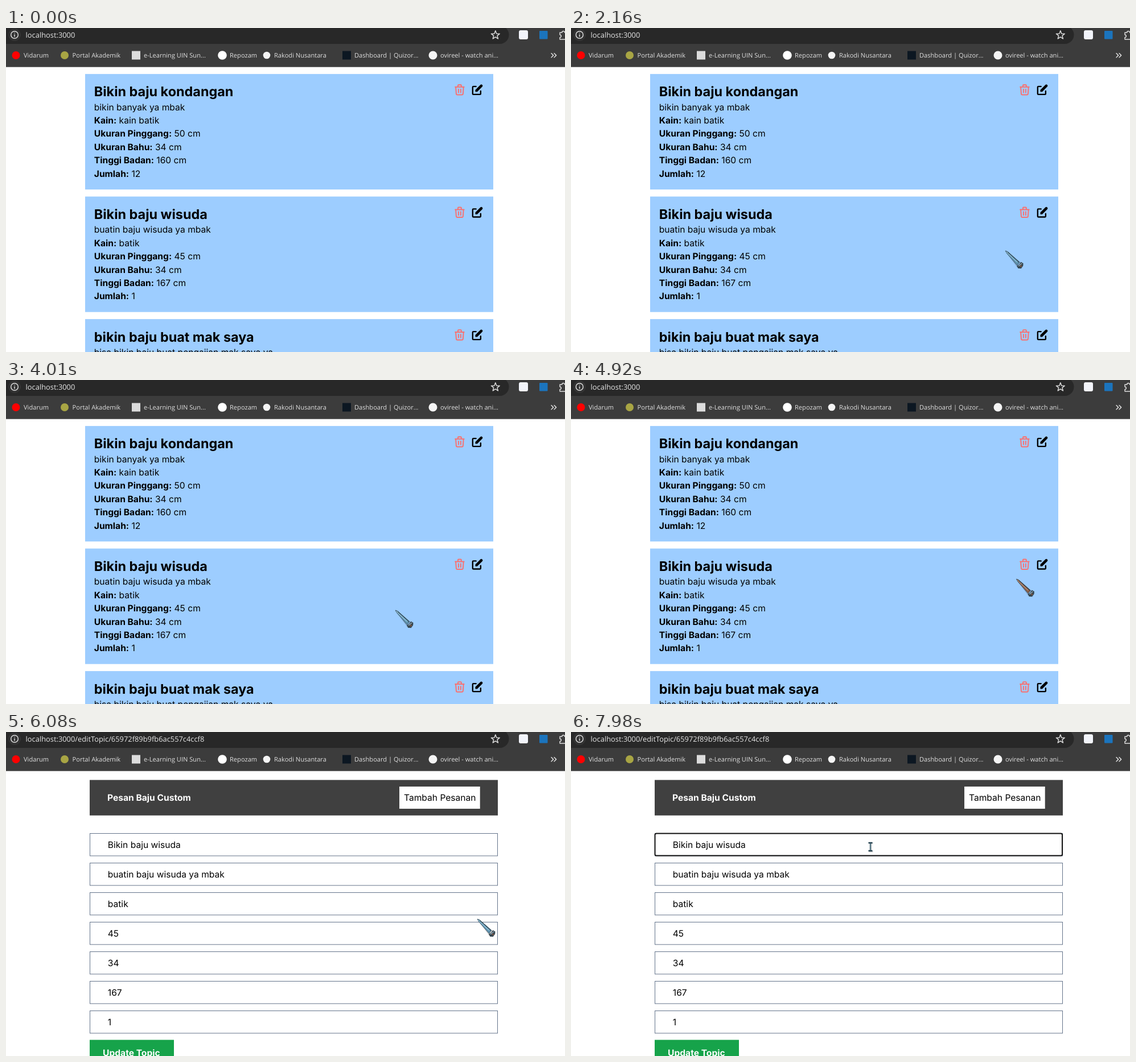
These frames come from a looping animation (982x570 px, 8000 ms). An HTML page:

```html
<!DOCTYPE html>
<html lang="id">
<head>
<meta charset="utf-8">
<title>Pesan Baju Custom</title>
<style>
html, body { margin: 0; width: 100%; height: 100%; overflow: hidden; background: #fff; }
svg { display: block; width: 100vw; height: 100vh; }
text { font: 400 15.6px Inter, sans-serif; font-variation-settings: "opsz" 14; text-rendering: geometricPrecision; }
text.title { font-weight: 700; font-size: 23.4px; }
.bold { font-weight: 700; }
text.url { font: 12.87px "Open Sans", sans-serif; fill: #e6e6e6; }
text.mark { font: 11.1px "Open Sans", sans-serif; fill: #dedede; }
.line { fill: none; stroke: #dcdcdc; stroke-width: 1.5; stroke-linejoin: round; stroke-linecap: round; }
.field { fill: #fff; stroke: #64748b; stroke-width: 1; }
</style>
</head>
<body>
<svg id="stage" viewBox="0 0 982 570" preserveAspectRatio="none"></svg>
<script>
const LOOP = 8000, START = 460, STEP = 68.4;
const OPEN_FORM = 82, FOCUS = 102, CARET_OFF = 110;
const HOST = 'localhost:3000';

const text = (x, y, s, cls = '', fill = '') =>
  `<text x="${x}" y="${y}" class="${cls}"${fill && ` fill="${fill}"`}>${s}</text>`;
const rect = (x, y, w, h, fill, r = 0) =>
  `<rect x="${x}" y="${y}" width="${w}" height="${h}" rx="${r}" fill="${fill}"/>`;
const disc = (x, y, r, fill) => `<circle cx="${x}" cy="${y}" r="${r}" fill="${fill}"/>`;
const line = d => `<path class="line" d="${d}"/>`;

function star(cx, cy, outer, inner) {
  let d = '';
  for (let i = 0; i < 10; i++) {
    const r = i % 2 ? inner : outer, a = i * Math.PI / 5;
    d += (i ? 'L' : 'M') + (cx + r * Math.sin(a)).toFixed(2) + ' ' + (cy - r * Math.cos(a)).toFixed(2);
  }
  return line(d + 'Z');
}

function browserBar() {
  const marks = [
    [31, 'Vidarum'], [116.5, 'Portal Akademik'], [242, 'e-Learning UIN Sun...'],
    [393, 'Repozam'], [471, 'Rakodi Nusantara'], [612, 'Dashboard | Quizor...'],
    [763, 'ovireel - watch ani...']
  ];
  return rect(0, 0, 982, 68.7, '#3c3c3c') + rect(-20, -4, 903.5, 32, '#282828', 16) +
    disc(15, 12, 11, '#333') +
    `<circle class="line" cx="15" cy="12" r="6.3"/>` + line('M15 11.8v3.2M15 9v.1') +
    star(859.8, 12.6, 7.8, 3.3) +
    rect(901, 4, 16, 16, '#f2f4fa', 3) + rect(937, 5, 14.5, 14.5, '#1b74bd', 1) +
    line('M986 8h-4.5a2.4 2.4 0 0 0-4.8 0H973v4a2.3 2.3 0 0 1 0 4.6V20h13') +
    line('M958 44.5l3.6 3.6-3.6 3.6M963 44.5l3.6 3.6-3.6 3.6') +
    disc(17.5, 48, 7, '#f00') + disc(103, 48, 7, '#a8a544') +
    rect(221, 40.5, 15, 15, '#dcdcdc') + disc(380, 48, 7.8, '#fff') +
    disc(458, 48, 6.3, '#f4f4f4') + rect(591, 40.5, 15, 15, '#0c1722') +
    disc(750, 48, 7.5, '#f4f4f4') +
    marks.map(([x, s]) => text(x, 52, s, 'mark')).join('');
}

const trash = `<path fill="none" stroke="#f87171" stroke-width="2" stroke-linecap="round" stroke-linejoin="round"
  transform="translate(785.2 16.1) scale(.974)"
  d="M19 7l-.867 12.142A2 2 0 0116.138 21H7.862a2 2 0 01-1.995-1.858L5 7m5 4v6m4-6v6m1-10V4a1 1 0 00-1-1h-4a1 1 0 00-1 1v3M4 7h16"/>`;
const pencil = `<path transform="translate(816.3 16.1) scale(1.169)"
  d="M17.414 2.586a2 2 0 00-2.828 0L7 10.172V13h2.828l7.586-7.586a2 2 0 000-2.828zM2 6a2 2 0 012-2h4a1 1 0 010 2H4v10h10v-4a1 1 0 112 0v4a2 2 0 01-2 2H4a2 2 0 01-2-2V6z"/>`;

const orders = [
  ['Bikin baju kondangan', 'bikin banyak ya mbak', 'kain batik', 50, 34, 160, 12],
  ['Bikin baju wisuda', 'buatin baju wisuda ya mbak', 'batik', 45, 34, 167, 1],
  ['bikin baju buat mak saya', 'bisa bikin baju buat pengajian mak saya ya', 'batik', 45, 34, 160, 1]
];

function card([title, note, cloth, waist, shoulder, height, count], i) {
  const rows = [['Kain', cloth], ['Ukuran Pinggang', waist + ' cm'], ['Ukuran Bahu', shoulder + ' cm'],
    ['Tinggi Badan', height + ' cm'], ['Jumlah', count]];
  return `<g transform="translate(0 ${80.9 + i * 215.6})">` +
    rect(139, 0, 717, 203.2, '#9dcdff') +
    text(154.8, 39.6, title, 'title') + text(154.8, 63.8, note) +
    rows.map(([k, v], n) =>
      text(154.8, 87.2 + n * 23.4, `<tspan class="bold">${k}:</tspan> ${v}`)).join('') +
    trash + pencil + '</g>';
}

function form() {
  const values = orders[1];
  return rect(147, 84.4, 717, 62.4, '#404040') +
    text(178, 121, 'Pesan Baju Custom', 'bold', '#fff') +
    rect(691, 96, 141.7, 39, '#fff') + text(699, 121, 'Tambah Pesanan') +
    values.map((v, i) =>
      `<rect class="field" x="147.5" y="${178.5 + i * 52}" width="716" height="39.4"/>` +
      text(178.8, 203.6 + i * 52, v)).join('') +
    '<rect id="focus" x="147.5" y="178.6" width="715.5" height="38.8" rx="2.5" fill="none" stroke="#101010" stroke-width="2"/>' +
    '<path id="caret" d="M306.5 188v19" stroke="#000"/>' +
    rect(147, 541.6, 148, 40, '#16a34a') + text(170, 569.8, 'Update Topic', 'bold', '#fff');
}

const sword = `<g id="sword">
  <path d="M2 3L26 22L32 25L28 32L21 30Z" fill="#000" opacity=".14"/>
  <path id="blade" d="M0 0L4 1.5L25 20L20.5 25.5L2.5 4.5Z" stroke="#3a4f5c" stroke-width=".8" stroke-linejoin="round"/>
  <path id="shine" d="M2 2L20.5 20" stroke-width="1.3"/>
  <path d="M4 2.5L25 21" stroke="#22323c" stroke-width="1"/>
  <path d="M27 19.5L31.5 22L31 26.5L27.5 31L22.5 31L20 26.5L24.5 24Z" fill="#34454f"/>
  <path d="M23 27L29 22" stroke="#9db4c0" stroke-width="1.3"/>
  <circle cx="27.3" cy="27" r="1.7" fill="#7a5646"/></g>`;
const beam = `<g id="beam" fill="none">
  <path d="M-2.5-6.5h7M1-6.5v15M-2.5 8.5h7" stroke="#000" stroke-width="2" opacity=".2"/>
  <path d="M-3.5-7h7M0-7v14M-3.5 7h7" stroke="#25424f" stroke-width="2.4"/>
  <path id="glint" d="M0-6v12" stroke-width=".9"/></g>`;

document.getElementById('stage').innerHTML =
  `<g id="list">${orders.map(card).join('')}</g><g id="form">${form()}</g>` +
  browserBar() + text(34.6, 17, HOST, 'url') + sword + beam;

const el = id => document.getElementById(id);
const url = document.querySelector('.url');
const show = (id, on) => el(id).style.display = on ? '' : 'none';

// time, x, y of the pointer's hot spot
const path = [
  [460, 906, 550], [600, 880, 470], [740, 850, 385], [880, 832, 338], [1020, 824, 324], [1280, 823, 319],
  [1500, 830, 317], [1800, 826, 330], [2020, 814, 364], [2160, 767, 391], [2300, 712, 403], [2450, 686, 404],
  [2840, 684, 400], [3000, 684, 405], [4570, 684, 405], [4750, 720, 386], [4950, 800, 340], [5100, 838, 325],
  [5300, 832, 327], [5500, 828, 329], [6250, 828, 329], [6400, 745, 345], [6550, 630, 302], [6700, 560, 256],
  [6850, 530, 212], [6950, 526, 202], [8000, 526, 202]
];

function pointerAt(t) {
  const i = Math.max(1, path.findIndex(p => p[0] >= t));
  const [t0, x0, y0] = path[i - 1], [t1, x1, y1] = path[i];
  const f = Math.max(0, (t - t0) / (t1 - t0));
  return [x0 + (x1 - x0) * f, y0 + (y1 - y0) * f];
}

const mix = (a, b, f) => `rgb(${a.map((v, i) => Math.round(v + (b[i] - v) * f))})`;

function draw(t) {
  const k = t < START ? -1 : Math.floor((t - START) / STEP + 0.2);
  const onForm = k >= OPEN_FORM;
  show('list', !onForm);
  show('form', onForm);
  show('focus', k >= FOCUS);
  show('caret', k >= FOCUS && k < CARET_OFF);
  url.textContent = HOST + (onForm ? '/editTopic/65972f89b9fb6ac557c4ccf8' : '');

  const [x, y] = pointerAt(Math.min(START + Math.max(k, 0) * STEP, LOOP));
  const overField = onForm && y >= 178 && (y - 178) % 52 < 40;
  show('sword', k >= 0 && !overField);
  show('beam', k >= 0 && overField);
  const at = `translate(${x.toFixed(1)} ${y.toFixed(1)})`;
  el('sword').setAttribute('transform', at);
  el('beam').setAttribute('transform', at);

  // the blade slowly shifts between steel and copper
  const warm = Math.max(0, Math.cos((k - 12) / 26 * 2 * Math.PI));
  el('blade').style.fill = mix([94, 146, 174], [134, 92, 70], warm);
  const light = mix([150, 196, 216], [190, 150, 126], warm);
  el('shine').style.stroke = light;
  el('glint').style.stroke = light;
}

const began = performance.now();
function tick() {
  draw((performance.now() - began) % LOOP);
  requestAnimationFrame(tick);
}
tick();
</script>
</body>
</html>
```
